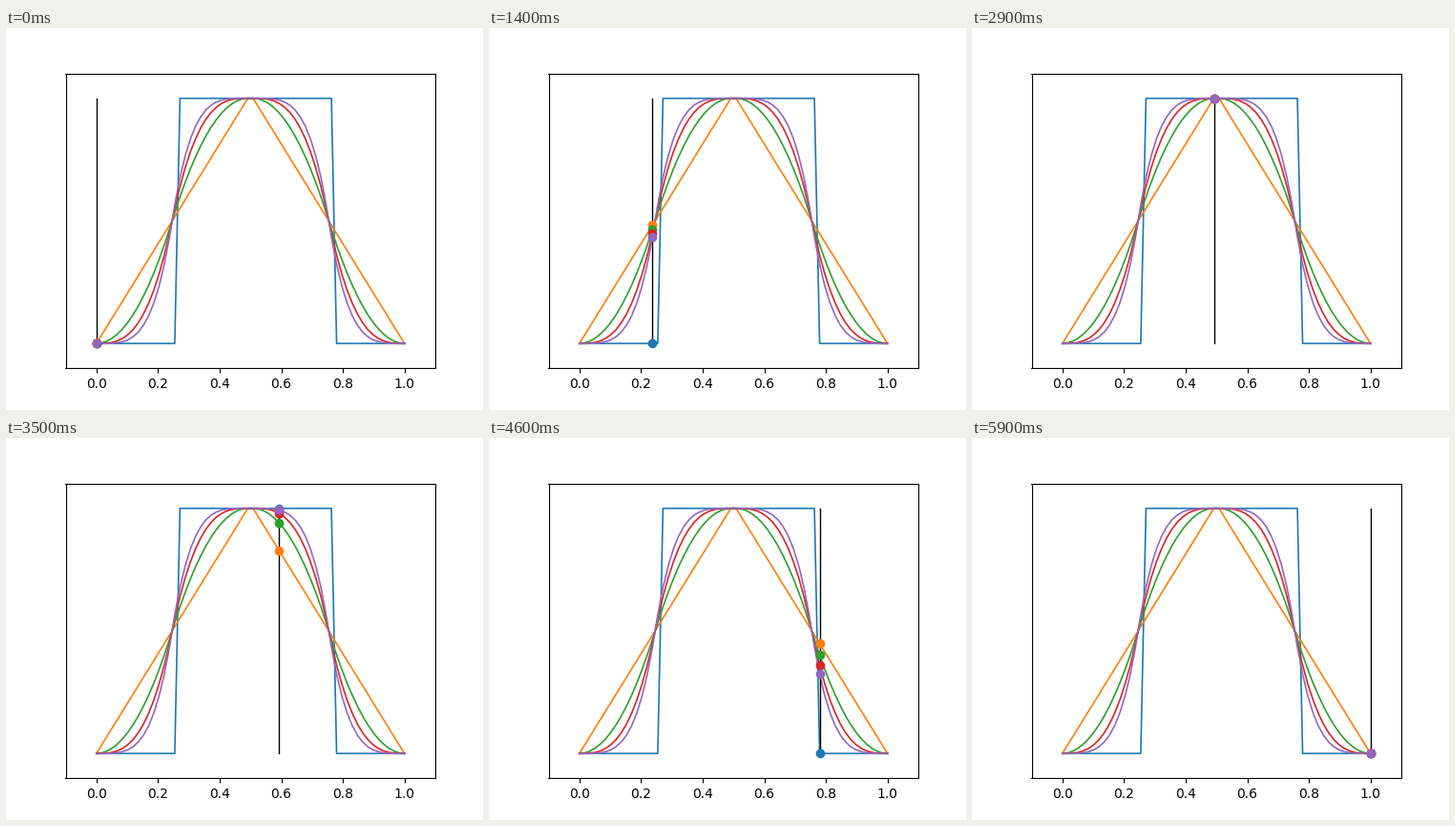
These frames come from a looping animation (500 px wide and 400 px high, 6000 ms). A matplotlib script:

```python
import numpy as np
import matplotlib.pyplot as plt
from matplotlib.animation import FuncAnimation

HALF = 30            # samples for the rise, and again for the fall
COUNT = 2 * HALF
INTERVAL = 100


def step(t):
    return np.where(t > 0.53, 1.0, 0.0)


def ease(power):
    """Symmetric ease-in-out of the given power."""
    def curve(t):
        scale = 2 ** (power - 1)
        return np.where(t < 0.5, scale * t ** power, 1 - scale * (1 - t) ** power)
    return curve


def there_and_back(curve):
    rise = curve(np.linspace(0, 1, HALF))
    return np.concatenate([rise, 1 - rise])


x = np.linspace(0, 1, COUNT)
tracks = [there_and_back(c) for c in (step, ease(1), ease(2), ease(3), ease(4))]

fig, ax = plt.subplots(figsize=(5, 4), dpi=100)
ax.set_xlim(-0.1, 1.1)
ax.set_ylim(-0.1, 1.1)
ax.set_xticks(np.linspace(0, 1, 6))
ax.set_yticks([])

for i, track in enumerate(tracks):
    ax.plot(x, track, color=f"C{i}", linewidth=1.2)
cursor, = ax.plot([0, 0], [0, 1], color="black", linewidth=1)
dots = [ax.plot([0], [0], "o", color=f"C{i}")[0] for i in range(len(tracks))]


def update(frame):
    cursor.set_xdata([x[frame]] * 2)
    for dot, track in zip(dots, tracks):
        dot.set_data([x[frame]], [track[frame]])
    return [cursor, *dots]


anim = FuncAnimation(fig, update, frames=COUNT, interval=INTERVAL,
                     repeat=True, repeat_delay=0)
plt.show()
```
